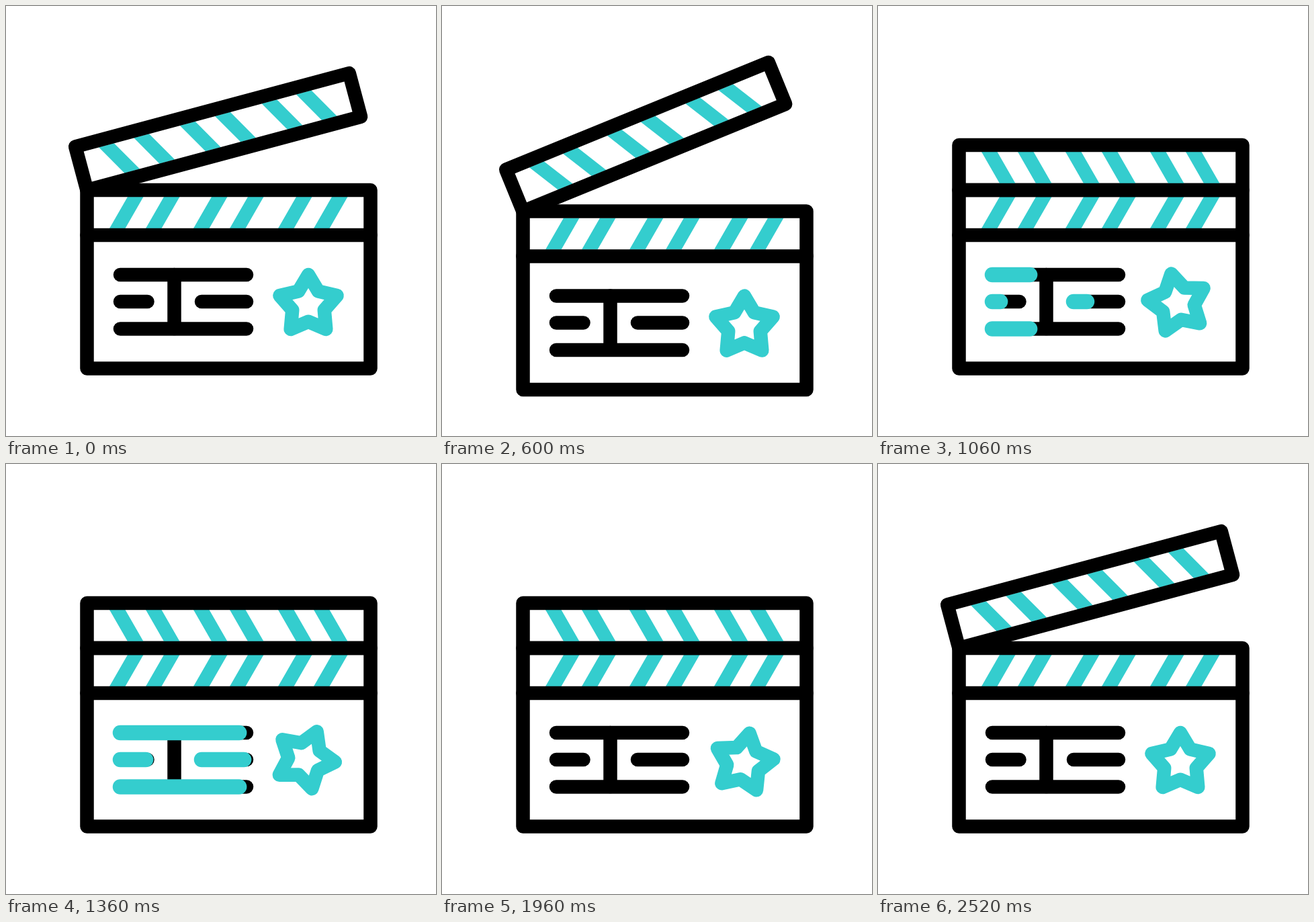
Recreate the animation shown at these times as an HTML page with a canvas. Size 640 px wide and 640 px high, loop 2.6 s.

```html
<!DOCTYPE html>
<html lang="en">
<head>
<meta charset="utf-8">
<title>Clapperboard</title>
<style>
  html, body { margin: 0; height: 100%; overflow: hidden; background: #fff; }
  canvas { display: block; }
</style>
</head>
<body>
<canvas id="stage" width="640" height="640"></canvas>
<script>
const ctx = document.getElementById('stage').getContext('2d');
const LOOP = 2600, BLACK = '#000', CYAN = '#34cdce';
const PIVOT = { x: 120.5, y: 274 };
const STAR = { x: 450, y: 440 };
const STRIPES = [154, 208, 279, 333, 405, 458];
const LINES = [[170, 358, 400], [170, 210.5, 440], [291, 358, 440], [170, 358, 480.5]];

// Keyframes: [time in ms, value]
const DROP = [[220, 0], [440, 47], [860, 0]];
const ARM = [[220, 15], [440, 25.6], [560, 25.6], [740, 0], [2080, 0], [2420, 15]];
const SPIN = [[620, 0], [1370, 95], [2120, 0]];
const TRIM = [[840, 0], [1450, 1], [1830, 0]];

function track(keys, t) {
  if (t <= keys[0][0]) return keys[0][1];
  for (let i = 1; i < keys.length; i++) {
    const [t0, a] = keys[i - 1], [t1, b] = keys[i];
    if (t < t1) {
      const u = (t - t0) / (t1 - t0);
      return a + (b - a) * u * u * (3 - 2 * u);
    }
  }
  return keys[keys.length - 1][1];
}

function line(x1, y1, x2, y2) {
  ctx.beginPath();
  ctx.moveTo(x1, y1);
  ctx.lineTo(x2, y2);
  ctx.stroke();
}

function pen(color, width) {
  ctx.strokeStyle = color;
  ctx.lineWidth = width;
}

function stripes(yLeft, yRight) {
  ctx.fillStyle = CYAN;
  for (const x of STRIPES) {
    ctx.beginPath();
    ctx.moveTo(x, yLeft);
    ctx.lineTo(x + 23.5, yLeft);
    ctx.lineTo(x + 50.5, yRight);
    ctx.lineTo(x + 27, yRight);
    ctx.fill();
  }
}

function rotated(center, degrees, paint) {
  ctx.save();
  ctx.translate(center.x, center.y);
  ctx.rotate(degrees * Math.PI / 180);
  ctx.translate(-center.x, -center.y);
  paint();
  ctx.restore();
}

function arm() {
  stripes(217, 264);
  pen(BLACK, 20.5);
  ctx.strokeRect(PIVOT.x, 207, 422, 67);
}

function star() {
  pen(CYAN, 20.5);
  ctx.beginPath();
  for (let i = 0; i < 10; i++) {
    const r = i % 2 ? 25 : 44.8, a = i * Math.PI / 5;
    ctx.lineTo(STAR.x + r * Math.sin(a), STAR.y + 4.8 - r * Math.cos(a));
  }
  ctx.closePath();
  ctx.stroke();
}

function board(trim) {
  stripes(331, 284);
  pen(BLACK, 20.5);
  ctx.strokeRect(PIVOT.x, PIVOT.y, 422, 265.5);
  line(PIVOT.x, 341, 542.5, 341);
  line(250.5, 400, 250.5, 480);
  for (const [x1, x2, y] of LINES) line(x1, y, x2, y);
  if (trim > 0) {
    pen(CYAN, 22.5);
    for (const [x1, x2, y] of LINES) line(x1, y, x1 + (x2 - x1) * trim, y);
  }
}

function draw() {
  const t = performance.now() % LOOP;
  ctx.fillStyle = '#fff';
  ctx.fillRect(0, 0, 640, 640);
  ctx.lineCap = ctx.lineJoin = 'round';
  ctx.save();
  ctx.translate(0, track(DROP, t));
  board(track(TRIM, t));
  rotated(PIVOT, -track(ARM, t), arm);
  rotated(STAR, track(SPIN, t), star);
  ctx.restore();
  requestAnimationFrame(draw);
}
draw();
</script>
</body>
</html>
```
